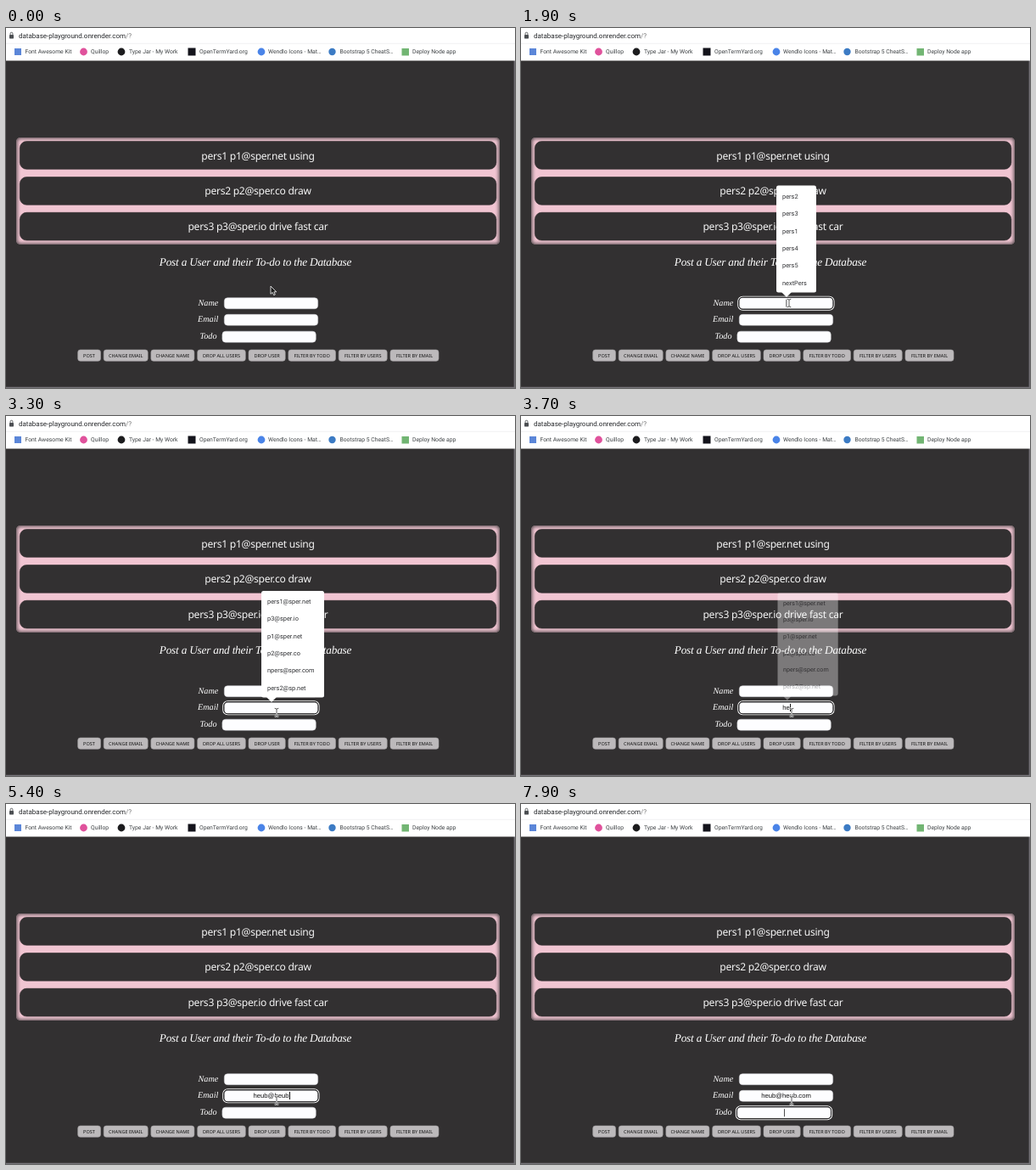
An HTML page for the animation above (8000 ms loop, 600 by 424 pixels).

```html
<!DOCTYPE html>
<html lang="en">
<head>
<meta charset="utf-8">
<title>Database playground</title>
<style>
html, body { margin: 0; width: 100%; height: 100%; overflow: hidden; background: #323031; }
svg { display: block; width: 600px; height: 424px; text-rendering: geometricPrecision; }

.bar { font: 6.8px Roboto, sans-serif; fill: #3c4043; }
.url { font-size: 8px; fill: #26282b; }
.list { position: absolute; left: 12px; top: 129px; width: 570px; height: 126px; box-sizing: border-box;
  border-radius: 5px; background: #f1c5d2; box-shadow: inset 0 0 4px 1px #4a4346; }
.card { fill: #323031; stroke: #2a2829; stroke-width: .6; }
.rows { font: 12.1px "Noto Sans", sans-serif; letter-spacing: -.28px; fill: #f6f6f6; text-anchor: middle; }
.serif { font: italic 10.2px "Liberation Serif", serif; fill: #fff; }
.title { font-size: 13.3px; letter-spacing: -.22px; text-anchor: middle; }
.field { fill: #fdfdff; stroke: #cfced4; stroke-width: .5; }
.btn rect { fill: #bcb9bb; stroke: #a5a2a4; stroke-width: .6; }
.btn { font: 5.55px "Noto Sans", sans-serif; fill: #111; text-anchor: middle; }
.pop { fill: #fff; }
.pop text { font: 7.4px Roboto, sans-serif; fill: #303134; }
.typed { font: 7.7px/12px "Liberation Sans", Arial, sans-serif; color: #111; text-align: center; white-space: nowrap; }
.typed::before { content: ""; animation: type 8s step-end infinite; }
.typed i { display: inline-block; width: .8px; height: 9px; margin-right: -.8px; vertical-align: -2px; background: #111; }

.k { opacity: 0; animation: 8s step-end infinite; }
.ring rect { fill: none; stroke: #fff; stroke-width: 1.1; }
.ring rect + rect { stroke: #1c1b1c; stroke-width: 1; }
.name-ring { animation-name: nameRing; }
.mail-ring { animation-name: mailRing; }
.todo-ring { animation-name: todoRing; }
.name-caret { animation-name: nameCaret; }
.mail-caret { animation-name: mailCaret; }
.todo-caret { animation-name: todoCaret; }
.name-pop { animation-name: namePop; }
.mail-pop { animation-name: mailPop; transform-box: fill-box; transform-origin: center; }
.arrow { animation-name: arrow; }
.beam { animation-name: beam; }
.cursor { animation: move 8s infinite; }

@keyframes nameRing { 0%, 35% { opacity: 0 } 11.25% { opacity: 1 } }
@keyframes mailRing { 0%, 86.25% { opacity: 0 } 35% { opacity: 1 } }
@keyframes todoRing { 0% { opacity: 0 } 86.25%, 100% { opacity: 1 } }
@keyframes nameCaret { 0%, 17.5%, 30% { opacity: 0 } 11.25%, 23.75% { opacity: 1 } }
@keyframes mailCaret {
  0%, 41.25%, 55%, 72.5%, 85% { opacity: 0 }
  35%, 45%, 60%, 77.5% { opacity: 1 }
}
@keyframes todoCaret { 0%, 92.5% { opacity: 0 } 86.25%, 98.75%, 100% { opacity: 1 } }
@keyframes namePop {
  0%, 37.5% { opacity: 0 }
  11.25% { opacity: 1 }
  35% { opacity: .5 }
  36.25% { opacity: .15 }
}
@keyframes mailPop {
  0%, 48.75% { opacity: 0; transform: none }
  36.25% { opacity: 1; transform: none }
  45% { opacity: .75; transform: scale(.985) }
  46.25% { opacity: .36; transform: scale(.965) }
  47.5% { opacity: .1; transform: scale(.95) }
}
@keyframes type {
  0% { content: "" }
  45% { content: "h" }
  46.25% { content: "he" }
  47.5% { content: "heu" }
  48.75% { content: "heub" }
  60% { content: "heub@" }
  66.25% { content: "heub@heu" }
  67.5% { content: "heub@heub" }
  77.5% { content: "heub@heub.c" }
  78.75%, 100% { content: "heub@heub.com" }
}
@keyframes move {
  0% { transform: translate(312px, 304px); animation-timing-function: step-end }
  1.25% { transform: translate(312px, 304px); animation-timing-function: steps(7, start) }
  10% { transform: translate(316px, 324px); animation-timing-function: step-end }
  26.25% { transform: translate(316px, 324px); animation-timing-function: steps(6, start) }
  33.75%, 100% { transform: translate(319px, 349px) }
}
@keyframes arrow { 0%, 27.5% { opacity: 1 } 6.25%, 31.25%, 100% { opacity: 0 } }
@keyframes beam { 0%, 27.5% { opacity: 0 } 6.25%, 31.25%, 100% { opacity: 1 } }
</style>
</head>
<body>
<svg viewBox="0 0 600 424">
  <rect width="600" height="424" fill="#323031"/>
  <path d="M599.3 38V424M0 423.3H600" stroke="#77757a" stroke-width="1.2"/>

  <!-- browser bar -->
  <rect width="600" height="38.5" fill="#fff"/>
  <path d="M0 18.3H600" stroke="#f1f1f3"/>
  <rect x="4" y="8" width="5" height="4.4" rx=".6" fill="#4b4e52"/>
  <path d="M5.1 8V6.6a1.4 1.4 0 0 1 2.8 0V8" fill="none" stroke="#4b4e52" stroke-width=".9"/>
  <rect x="10" y="24" width="8" height="8" fill="#5b86d8"/>
  <circle cx="91.500" cy="28" r="4.400" fill="#e0529c"/>
  <circle cx="136" cy="28" r="4.400" fill="#1c1c1e"/>
  <rect x="214.500" y="23.500" width="9" height="9" fill="#14141c"/>
  <circle cx="301" cy="28" r="4.400" fill="#4a84e8"/>
  <circle cx="384.500" cy="28" r="4.200" fill="#3c7bc4"/>
  <rect x="466.500" y="24" width="8.500" height="8.500" fill="#72b573"/>
  <g class="bar">
    <text class="url" x="15" y="12">database-playground.onrender.com<tspan fill="#777">/?</tspan></text>
    <text x="22.500" y="30.300">Font Awesome Kit</text>
    <text x="100" y="30.300">Quillop</text>
    <text x="145" y="30.300">Type Jar - My Work</text>
    <text x="228" y="30.300">OpenTermYard.org</text>
    <text x="309" y="30.300">Wendlo Icons - Mat…</text>
    <text x="393.500" y="30.300">Bootstrap 5 CheatS…</text>
    <text x="479" y="30.300">Deploy Node app</text>
  </g>

  <!-- user list -->
  <foreignObject width="600" height="424"><div class="list"></div></foreignObject>
  <rect class="card" x="16.300" y="133.500" width="561.600" height="32.800" rx="8"/>
  <rect class="card" x="16.300" y="175.500" width="561.600" height="32.800" rx="8"/>
  <rect class="card" x="16.300" y="217.300" width="561.600" height="32.800" rx="8"/>
  <g class="rows">
    <text x="297" y="154.500">pers1 p1@sper.net using</text>
    <text x="297" y="196.300">pers2 p2@sper.co draw</text>
    <text x="297" y="238.200">pers3 p3@sper.io drive fast car</text>
  </g>

  <!-- form -->
  <g class="serif">
    <text class="title" x="294" y="280">Post a User and their To-do to the Database</text>
    <text x="226.500" y="326.500">Name</text>
    <text x="226" y="346">Email</text>
    <text x="228.500" y="366">Todo</text>
  </g>
  <rect class="field" x="257.300" y="317.700" width="110.400" height="13" rx="4"/>
  <rect class="field" x="257.300" y="337.300" width="110.400" height="13" rx="4"/>
  <rect class="field" x="254.900" y="357.200" width="110.400" height="13" rx="4"/>
  <g class="k ring name-ring">
    <rect x="255.800" y="316.200" width="113.200" height="16" rx="5.500"/>
    <rect x="256.800" y="317.200" width="111.200" height="14" rx="4.500"/>
  </g>
  <g class="k ring mail-ring">
    <rect x="255.800" y="335.800" width="113.200" height="16" rx="5.500"/>
    <rect x="256.800" y="336.800" width="111.200" height="14" rx="4.500"/>
  </g>
  <g class="k ring todo-ring">
    <rect x="253.400" y="355.700" width="113.200" height="16" rx="5.500"/>
    <rect x="254.400" y="356.700" width="111.200" height="14" rx="4.500"/>
  </g>
  <rect class="k name-caret" x="312.500" y="319.700" width=".8" height="9" fill="#222"/>
  <rect class="k todo-caret" x="310" y="359.200" width=".8" height="9" fill="#222"/>
  <foreignObject x="258" y="337.500" width="109" height="13">
    <div class="typed"><i class="k mail-caret"></i></div>
  </foreignObject>

  <g class="btn">
    <rect x="84.700" y="379" width="26.800" height="13.300" rx="3"/><text x="98" y="387.800">POST</text>
    <rect x="115.200" y="379" width="52" height="13.300" rx="3"/><text x="141.200" y="387.800">CHANGE EMAIL</text>
    <rect x="170.900" y="379" width="51" height="13.300" rx="3"/><text x="196.400" y="387.800">CHANGE NAME</text>
    <rect x="225.700" y="379" width="56.600" height="13.300" rx="3"/><text x="254" y="387.800">DROP ALL USERS</text>
    <rect x="286" y="379" width="43.200" height="13.300" rx="3"/><text x="307.600" y="387.800">DROP USER</text>
    <rect x="332.900" y="379" width="55.600" height="13.300" rx="3"/><text x="360.700" y="387.800">FILTER BY TODO</text>
    <rect x="392.200" y="379" width="57" height="13.300" rx="3"/><text x="420.700" y="387.800">FILTER BY USERS</text>
    <rect x="453" y="379" width="57" height="13.300" rx="3"/><text x="481.500" y="387.800">FILTER BY EMAIL</text>
  </g>

  <!-- autofill popups -->
  <g class="k pop name-pop">
    <rect x="301" y="185.500" width="47" height="126" rx="2.500"/>
    <path d="M307 311H319L313 317Z"/>
    <text x="308" y="200.800">pers2</text>
    <text x="308" y="221.200">pers3</text>
    <text x="308" y="241.500">pers1</text>
    <text x="308" y="261.900">pers4</text>
    <text x="308" y="282.200">pers5</text>
    <text x="308" y="302.600">nextPers</text>
  </g>
  <g class="k pop mail-pop">
    <rect x="301" y="206" width="74" height="125.500" rx="2.500"/>
    <path d="M307 331H319L313 337Z"/>
    <text x="308" y="220.900">pers1@sper.net</text>
    <text x="308" y="241.300">p3@sper.io</text>
    <text x="308" y="261.700">p1@sper.net</text>
    <text x="308" y="282.100">p2@sper.co</text>
    <text x="308" y="302.400">npers@sper.com</text>
    <text x="308" y="322.800">pers2@sp.net</text>
  </g>

  <g class="cursor">
    <path class="k arrow" d="M0 0V9.300L2.200 7.400 3.700 10.700 5.300 10 3.900 6.800H6.700Z" fill="#1b1b1b" stroke="#fff" stroke-width=".8"/>
    <g class="k beam" fill="none">
      <path d="M-2.300-4.700Q0-4.700 0-3.300 0-4.700 2.300-4.700M0-3.300V3.300M-2.300 4.700Q0 4.700 0 3.300 0 4.700 2.300 4.700" stroke="#fff" stroke-width="1.900"/>
      <path d="M-2.300-4.700Q0-4.700 0-3.300 0-4.700 2.300-4.700M0-3.300V3.300M-2.300 4.700Q0 4.700 0 3.300 0 4.700 2.300 4.700" stroke="#333" stroke-width=".8"/>
    </g>
  </g>
</svg>
</body>
</html>
```
